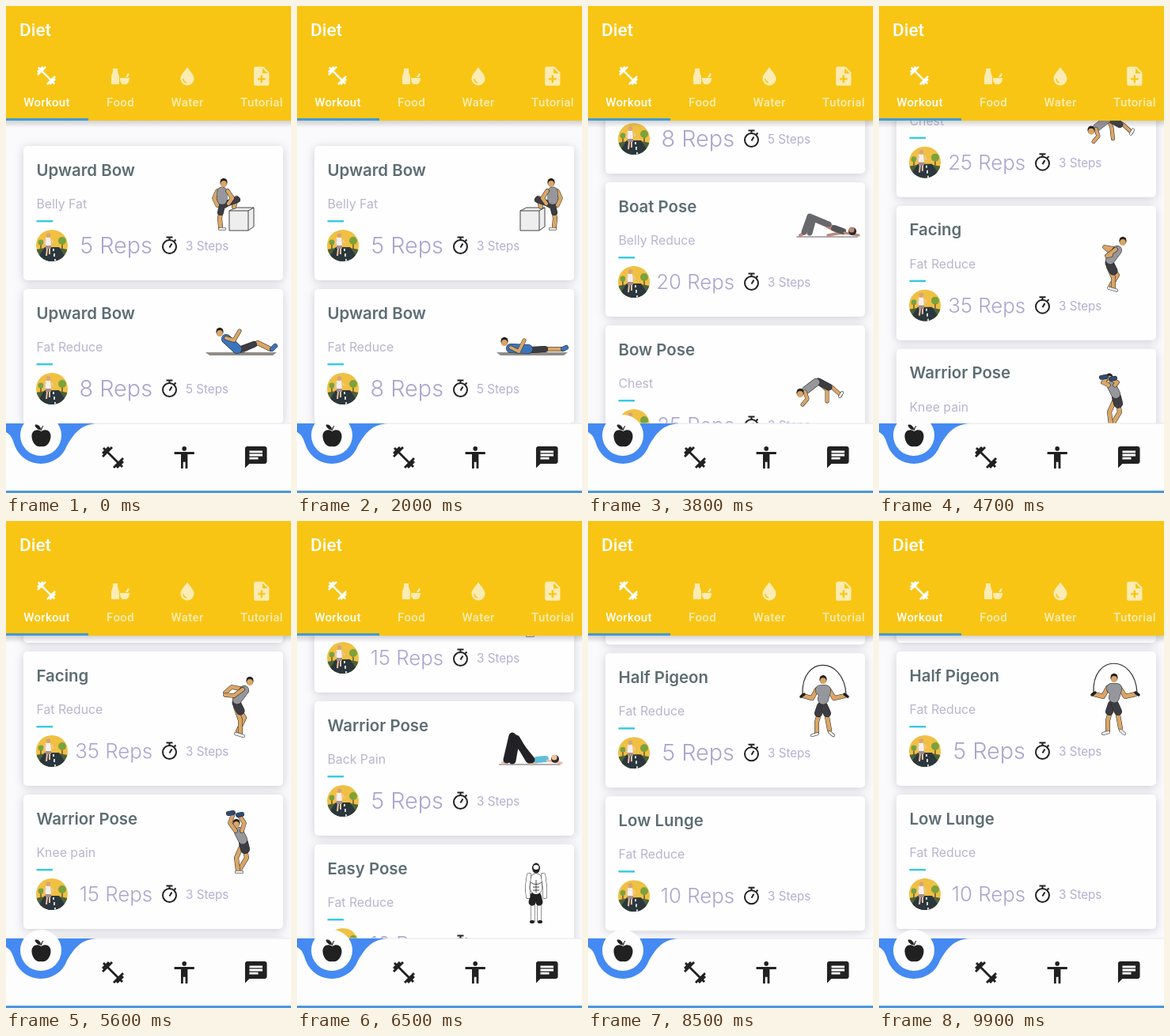
An HTML page that plays this animation: 360 by 616 pixels, repeating every 10 s.

```html
<!DOCTYPE html>
<html lang="en">
<head>
<meta charset="utf-8">
<title>Diet</title>
<style>
  html, body { margin: 0; width: 100%; height: 100%; overflow: hidden; background: #fafafc; }
  svg { display: block; width: 100%; height: 100%; }
  .card { font-family: Inter, "Open Sans", sans-serif; font-weight: 300; fill: #aba4cf; }
  .card > rect { fill: #fefefe; filter: drop-shadow(0 2px 6px rgba(90, 90, 120, .28)); }
  .title { font-size: 20.4px; font-weight: 600; fill: #5d6d73; }
  .sub { font-size: 15.8px; font-weight: 400; fill: #bab5cd; }
  .steps { font-size: 15.2px; font-weight: 400; fill: #b5afd0; }
  .bar { font-family: Roboto, sans-serif; font-weight: 500; fill: #fff; }
  .tab { font-size: 15px; letter-spacing: .3px; text-anchor: middle; }
  .off { opacity: .68; }
  polyline { fill: none; stroke-linejoin: round; stroke-linecap: round; }
</style>
</head>
<body>
<svg viewBox="0 0 360 616">
  <defs>
    <linearGradient id="shade" x2="0" y2="1">
      <stop stop-color="#555" stop-opacity=".25"/><stop offset="1" stop-color="#555" stop-opacity="0"/>
    </linearGradient>
    <clipPath id="round"><circle r="20"/></clipPath>
    <path id="dumbbell" d="M20.57 14.86L22 13.43 20.57 12 17 15.57 8.43 7 12 3.43 10.57 2 9.14 3.43 7.71 2 5.57 4.14 4.14 2.71 2.71 4.14l1.43 1.43L2 7.71l1.43 1.43L2 10.57 3.43 12 7 8.43 15.57 17 12 20.57 13.43 22l1.43-1.43L16.29 22l2.14-2.14 1.43 1.43 1.43-1.43-1.43-1.43L22 16.29z"/>
    <g id="avatar" clip-path="url(#round)">
      <rect x="-20" y="-20" width="40" height="40" fill="#f0c043"/>
      <path d="M-20 5Q0 0 20 5V20H-20z" fill="#4b6138"/>
      <path d="M-9 2H9L21 20H-21z" fill="#2b373d"/>
      <path d="M2 4V7M3 10V14M4 17V20" stroke="#fff" stroke-width="1.6"/>
      <path d="M13-5V4M-14-3V4" stroke="#795028" stroke-width="1.5"/>
      <circle cx="13" cy="-6" r="5" fill="#7ba23b"/><circle cx="-14" cy="-4" r="3.5" fill="#7ba23b"/>
      <path d="M-8-10H-2L-1 0H-8z" fill="#f5f0ee"/>
      <path d="M-8 0H-1L-1 4H-8z" fill="#a58d8c"/>
      <path d="M-6 4L-7 13M-3 4L-3 11M-8-8L-10-1M-1-8L2-3" stroke="#edc3a6" stroke-width="2"/>
      <circle cx="-4.5" cy="-13" r="2.8" fill="#d9a27a"/>
    </g>
    <g id="timer" fill="none" stroke="#222" stroke-width="2">
      <circle r="8.5"/><path d="M-4-12H4M0-12V-8M6-7L8-9M0 1L3-4"/>
    </g>
  </defs>

  <rect width="360" height="616" fill="#fafafc"/>
  <g id="list"></g>

  <g class="bar">
    <rect y="145" width="360" height="9" fill="url(#shade)"/>
    <rect width="360" height="145" fill="#f8c515"/>
    <rect y="142" width="104" height="3" fill="#429bd6"/>
    <text x="17" y="38" font-size="22.5">Diet</text>
    <use href="#dumbbell" transform="translate(36.6 73.6) scale(1.2)"/>
    <text class="tab" x="51.5" y="126.5">Workout</text>
    <g class="off">
      <path d="M135 79h6v4l2 6v10h-10v-10l2-6zM144 91h12q0 6-4 8h-5q-3-2-3-8zM151 90l3-5 2 1-2 4z"/>
      <text class="tab" x="144.5" y="126.5">Food</text>
      <path d="M229 77.5C233 83 237.5 87 237.5 92a8.5 8.5 0 0 1-17 0C220.5 87 225 83 229 77.5z"/>
      <path d="M224 92q0 4 4 5" fill="none" stroke="#f8c515" stroke-width="1.5"/>
      <text class="tab" x="229" y="126.5">Water</text>
      <path transform="translate(308.4 74.4) scale(1.2)" d="M14 2H6c-1.1 0-2 .9-2 2v16c0 1.1.9 2 2 2h12c1.1 0 2-.9 2-2V8l-6-6zm2 14h-3v3h-2v-3H8v-2h3v-3h2v3h3v2zm-3-7V3.5L18.5 9H13z"/>
      <text class="tab" x="323" y="126.5">Tutorial</text>
    </g>
  </g>

  <g fill="#212121">
    <path d="M0 528H360V616H0z" fill="#fdfdfd"/>
    <path d="M0 528H360" stroke="#e6e6ea"/>
    <path d="M0 528H115C94 529 86 541 77 556C66 586 23 587 11 556C8 547 6 542 0 539z" fill="#448af2"/>
    <circle cx="44" cy="543" r="26" fill="#fdfdfd"/>
    <path d="M44.500 538C39 534 32 537 32.500 545C33 552 38 559 44.500 557C51 559 56 552 56.500 545C57 537 50 534 44.500 538z"/>
    <path d="M43.500 536C39 535 37 532 37 530C41 529.500 43.500 532 43.500 536zM44.500 537Q44.500 533 47 531" stroke="#212121"/>
    <use href="#dumbbell" transform="translate(118.2 554.2) scale(1.4)"/>
    <path transform="translate(208.4 554.3) scale(1.4)" d="M12 2a2 2 0 1 1 0 4a2 2 0 1 1 0-4zm9 7h-6v13h-2v-6h-2v6H9V9H3V7h18v2z"/>
    <path transform="translate(299.2 554.2) scale(1.38)" d="M20 2H4c-1.1 0-2 .9-2 2V22l4-4h14c1.1 0 2-.9 2-2V4c0-1.1-.9-2-2-2zM6 9h12v2H6V9zm8 5H6v-2h8v2zm4-6H6V6h12v2z"/>
    <rect y="613" width="360" height="3" fill="#4b97dc"/>
  </g>
</svg>

<script>
const LOOP = 10000, PITCH = 181, TOP = 177;
const SKIN = '#d9a667', SHIRT = '#96979c', DARK = '#3c3d43', BLUE = '#3976bd', INK = '#2b2826';

const cards = [
  ['Upward Bow', 'Belly Fat', 5, 3],
  ['Upward Bow', 'Fat Reduce', 8, 5],
  ['Boat Pose', 'Belly Reduce', 20, 3],
  ['Bow Pose', 'Chest', 25, 3],
  ['Facing', 'Fat Reduce', 35, 3],
  ['Warrior Pose', 'Knee pain', 15, 3],
  ['Warrior Pose', 'Back Pain', 5, 3],
  ['Easy Pose', 'Fat Reduce', 10, 5],
  ['Half Pigeon', 'Fat Reduce', 5, 3],
  ['Low Lunge', 'Fat Reduce', 10, 3],
];

// Swipes: start, duration, distance, deceleration power
const swipes = [[2550, 1300, 316, 3], [4050, 1600, 420, 3], [5850, 1400, 353, 3], [7850, 900, 371, 4]];

const wave = (t, period) => (1 - Math.cos(t / period * 2 * Math.PI)) / 2;
const clamp = (v, lo, hi) => Math.min(hi, Math.max(lo, v));

const line = (color, width, ...points) =>
  `<polyline points="${points}" stroke="${color}" stroke-width="${width}"/>`;
const limb = (color, width, ...points) => line(INK, width + 1, ...points) + line(color, width, ...points);
const head = (x, y) => `<ellipse cx="${x}" cy="${y}" rx="4.6" ry="5.2" fill="#25201e"/>
  <ellipse cx="${x}" cy="${y + 2}" rx="3.8" ry="3.9" fill="${SKIN}"/>`;

function stepUp(t) {
  const s = clamp(-1.2 * Math.cos(t / 1333.3 * 2 * Math.PI), -1, 1);
  const u = Math.abs(s), lift = 29 * (1 - u), x = -25 * u;
  return `<path d="M282 82l8-4h23v24l-7 5h-24z" fill="#eee" stroke="#444"/><path d="M282 82h24v25M306 82l7-4" fill="none" stroke="#444"/>
    <g transform="translate(298) scale(${s > 0 ? -1 : 1} 1)">` +
    limb(SKIN, 5, x, 76 - lift, x - 3, 91 - lift, x - 2, 103 - lift) + limb('#eee', 3, x - 3, 105 - lift, x + 3, 105 - lift) +
    limb(SKIN, 5, x + 3, 76 - lift, 4 - 11 * u, 62 + 4 * u, 5 - 15 * u, 77) +
    limb(DARK, 7, x - 2, 84 - lift, x, 75 - lift, 4 - 10 * u, 62 + 6 * u) +
    limb(SKIN, 4.5, x - 6, 57 - lift, x - 10, 66 - lift, x - 6, 75 - lift) +
    limb(SHIRT, 12, x, 58 - lift, x, 68 - lift) +
    limb(SKIN, 4.5, x + 7, 57 - lift, x + 13, 66 - lift, x + 8, 73 - lift) +
    head(x + 2, 46 - lift) + '</g>';
}

function sitUp(t) {
  const m = 1 - wave(t, 1333.3), x = 262 + 8 * m, y = 66 - 12 * m;
  return '<path d="M252 80h90l-5 4h-80z" fill="#918c88"/>' +
    limb(SKIN, 5, 298, 78, 318, 76 - 8 * m, 334, 76) +
    limb(BLUE, 5, 336, 76, 340, 74 - 2 * m) +
    limb(DARK, 7, 294, 77, 313, 76 - 6 * m) +
    limb(BLUE, 11, x + 8, y + 9, 292, 76) +
    limb(SKIN, 4, x + 8, y + 8, x + 18, y + 13 - 2 * m, x + 25, y - 1) + head(x, y);
}

function bridge(m, legs, top, skin, x, y, kneeUp, width) {
  const hip = y - 14 + 10 * m;
  return line('#b4adb2', 2, x - 4, y + 2, x + 72, y + 2) +
    line(skin, 4, x, y, x + 6, y - 3) + line(skin, 3.5, x + 52, y - 3, x + 35, y) +
    line(skin, 7, x + 36, hip + 2, x + 50, y - 5) + line(top, 8, x + 43, (hip + y) / 2 - 2, x + 54, y - 5) +
    line(legs, width, x + 5, y - 4, x + 12, y - kneeUp, x + 36, hip) +
    line(legs, width, x + 12, y - 3, x + 17, y - kneeUp + 3, x + 33, hip) +
    line(skin, 3, x + 56, y - 3, x + 74, y) +
    `<circle cx="${x + 66}" cy="${y - 5}" r="5" fill="#30272a"/><circle cx="${x + 65}" cy="${y - 7}" r="3.5" fill="${skin}"/>`;
}

function climber(m) {
  return limb(SKIN, 4, 289, 70, 302 - 10 * m, 82, 302 - 8 * m, 96) +
    limb(SKIN, 4, 294, 71, 308, 78, 319, 88) + limb('#eee', 3, 318, 90, 321, 85) +
    limb(DARK, 8, 291, 71, 304, 78) + limb(SHIRT, 9, 275, 82, 288, 72) +
    limb(SKIN, 4, 274, 84, 277, 93, 271, 100) + head(268, 85);
}

function squat(m) {
  const d = 9 * m;
  return limb(SKIN, 4.5, 301, 48 + d, 285, 45 + d, 277 + 20 * m, 52 + d) +
    limb(SKIN, 5, 293, 70 + d, 301, 84 + d / 2, 293, 101) + limb(SKIN, 5, 290, 70 + d, 296, 87 + d / 2, 296, 103) +
    limb('#eee', 3, 290, 104, 300, 107) + limb(DARK, 10, 291, 65 + d, 296, 75 + d) +
    limb(SHIRT, 11, 301, 49 + d, 292, 61 + d) +
    limb(SKIN, 4.5, 299, 48 + d, 288, 56 + d, 277 + 20 * m, 55 + d) + head(308, 37 + d);
}

function press(m) {
  const y = 24 + 15 * m;
  return limb(SKIN, 5, 301, 64, 304, 80, 295, 95) + limb(SKIN, 5, 298, 64, 291, 80, 293, 96) +
    limb('#eee', 3, 291, 98, 298, 98) + limb(DARK, 11, 300, 61, 302, 69) + limb(SHIRT, 11, 294, 47, 299, 57) +
    head(291, 36) + limb(SKIN, 4.5, 298, 46, 301, 36 + 8 * m, 295, y + 3) + limb(SKIN, 4.5, 290, 46, 283, 36 + 8 * m, 286, y + 3) +
    limb('#2c4b75', 5, 281, y, 287, y - 1) + limb('#2c4b75', 5, 293, y + 2, 298, y + 1);
}

function shrug(m) {
  const y = 42 - 3 * m;
  return limb('#fff', 5, 298, 74, 298, 96) + limb('#fff', 5, 306, 74, 306, 96) +
    limb('#222', 3, 296, 98, 298, 98) + limb('#222', 3, 306, 98, 308, 98) +
    limb('#222', 8, 299, 65, 297, 73) + limb('#222', 8, 304, 65, 306, 73) +
    limb('#fff', 14, 302, y + 5, 302, 56) +
    '<path d="M295 48q7 5 14 0M302 45v16M298 54h8M298 58h8" fill="none" stroke="#444"/>' +
    limb('#fff', 5, 293, y, 291, 54, 292, 66) + limb('#fff', 5, 311, y, 313, 54, 313, 66) +
    `<ellipse cx="302" cy="${y - 9}" rx="5" ry="6.500" fill="#222"/><ellipse cx="302" cy="${y - 10}" rx="3.500" ry="3" fill="#fff"/>`;
}

function jumpRope(t) {
  const swing = Math.cos(Math.floor((t - 8500) / 200) / 7 * 2 * Math.PI);
  const y = swing < -.4 ? -4 : 0, end = 52 + y - 49 * swing;
  return `<path d="M271 ${52 + y}C269 ${end} 323 ${end} 326 ${52 + y}" fill="none" stroke="#333" stroke-width="1.2"/>` +
    limb(SKIN, 5, 294, 70 + y, 289, 87 + y, 289, 100 + y) + limb(SKIN, 5, 300, 70 + y, 303, 86 + y, 305, 97 + y) +
    limb('#eee', 3, 283, 104 + y, 290, 102 + y) + limb('#eee', 3, 305, 100 + y, 310, 104 + y) +
    limb(DARK, 9, 294, 67 + y, 291, 76 + y) + limb(DARK, 9, 298, 67 + y, 302, 76 + y) +
    limb(SKIN, 5, 289, 46 + y, 283, 57 + y, 272, 54 + y) + limb(SKIN, 5, 304, 46 + y, 311, 57 + y, 324, 54 + y) +
    limb(SHIRT, 13, 294, 47 + y, 300, 47 + y, 297, 58 + y) + head(297, 33 + y) +
    line('#222', 3.5, 269, 55 + y, 273, 52 + y) + line('#222', 3.5, 324, 52 + y, 328, 55 + y);
}

const rep = (t, rest) => wave(t - rest, 1400);
const figures = [
  stepUp,
  sitUp,
  t => bridge(rep(t, 3800), '#67686c', '#55565b', '#b98b78', 268, 67, 24, 7),
  t => climber(rep(t, 3800)),
  t => squat(rep(t, 5600)),
  t => press(rep(t, 5600)),
  t => bridge(rep(t, 7200), '#222226', '#5fbfd8', '#edc0a2', 260, 78, 34, 9),
  t => shrug(rep(t, 7200)),
  jumpRope,
];

const list = document.getElementById('list');
list.innerHTML = cards.map(([title, sub, reps, steps], i) => `
  <g class="card" transform="translate(0 ${TOP + i * PITCH})">
    <rect x="22" width="328" height="170" rx="5"/>
    <text class="title" x="38.5" y="37.5">${title}</text>
    <text class="sub" x="38.5" y="79">${sub}</text>
    <path d="M38.5 95.2H59" stroke="#35c9e4" stroke-width="2.4"/>
    <use href="#avatar" x="58" y="126"/>
    <text x="185" y="${reps > 9 ? 135 : 136}" text-anchor="end" font-size="${reps > 9 ? 25.8 : 28.8}">${reps} Reps</text>
    <use href="#timer" x="206.5" y="127.5"/>
    <text class="steps" x="227" y="132">${steps} Steps</text>
    <g class="figure"></g>
  </g>`).join('');
const slots = [...list.querySelectorAll('.figure')];

const scrollAt = t => swipes.reduce((sum, [start, length, distance, power]) =>
  sum + distance * (1 - (1 - clamp((t - start) / length, 0, 1)) ** power), 0);

function draw(now) {
  const t = now % LOOP, scroll = scrollAt(t);
  list.setAttribute('transform', `translate(0 ${-scroll})`);
  figures.forEach((figure, i) => {
    const y = TOP + i * PITCH - scroll;
    if (y > -30 && y < 530) slots[i].innerHTML = figure(t);
  });
  requestAnimationFrame(draw);
}
draw(0);
</script>
</body>
</html>
```
